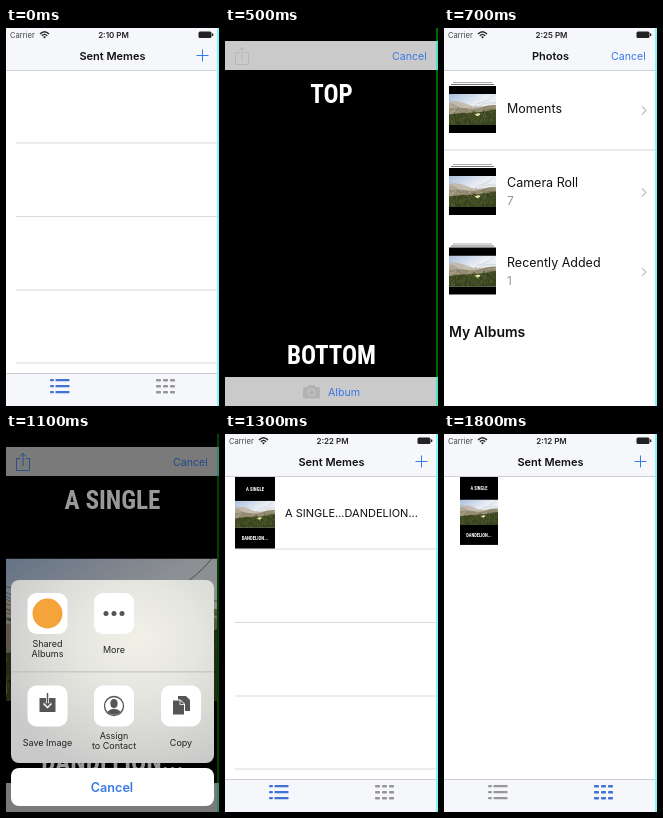
An HTML page that plays this animation: 213x378 px, repeating every 2 s.

```html
<!DOCTYPE html>
<html lang="en">
<head>
<meta charset="utf-8">
<title>Meme app walkthrough</title>
<style>
  html, body { margin: 0; width: 100%; height: 100%; overflow: hidden; background: #fff; }
  svg { display: block; width: 100vw; height: 100vh; }
  text { font-family: Inter, Roboto, sans-serif; white-space: pre; }
  .meme { font-family: "Roboto Condensed", "Liberation Sans Narrow", Roboto, sans-serif;
          font-weight: 800; font-stretch: 75%; }
</style>
</head>
<body>
<svg id="stage" viewBox="0 0 213 378" preserveAspectRatio="none"></svg>
<script>
const BLUE = '#3a79e8', ICON = '#4272d4', GRAY = '#979797', BAR = '#f5f7fb', EDITOR_BAR = '#cacaca';

const rect = (x, y, w, h, fill, r = 0) =>
  `<rect x="${x}" y="${y}" width="${w}" height="${h}" fill="${fill}" rx="${r}"/>`;
const line = (d, color, width = 1) =>
  `<path d="${d}" fill="none" stroke="${color}" stroke-width="${width}"/>`;
const shape = (d, fill) => `<path d="${d}" fill="${fill}"/>`;
const circle = (x, y, r, fill) => `<circle cx="${x}" cy="${y}" r="${r}" fill="${fill}"/>`;
const text = (s, x, y, size, fill = '#111', weight = 400, anchor = 'start') =>
  `<text x="${x}" y="${y}" font-size="${size}" fill="${fill}" font-weight="${weight}" text-anchor="${anchor}">${s}</text>`;
const centered = (s, x, y, size, fill, weight) => text(s, x, y, size, fill, weight, 'middle');
const caption = (s, x, y, size) =>
  `<text class="meme" x="${x}" y="${y}" font-size="${size}" fill="#fff" text-anchor="middle">${s}</text>`;
const photo = (x, y, w, h) => `<use href="#photo" x="${x}" y="${y}" width="${w}" height="${h}"/>`;

function random(seed) {
  return () => (seed = (seed * 16807) % 2147483647) / 2147483647;
}

// Dune landscape with plants and one pale flower, 169 x 113
function photoSymbol() {
  const rnd = random(77);
  const num = v => v.toFixed(1);
  const greens = ['#27301a', '#3c4a20', '#596c2c', '#7d8a45', '#2f3a1c', '#5c4a32', '#465524'];
  let shrubs = '', plants = '', stalks = '';
  for (let i = 0; i < 70; i++) {
    const x = rnd() * 169, y = 44 + rnd() * 28;
    shrubs += line(`M${num(x)} ${num(y)}l${num(4 + rnd() * 6)} ${num(rnd() * 4 - 1)}`,
      ['#6d6a50', '#d0c8bb', '#7f7a5c'][i % 3], 1.5);
  }
  for (let i = 0; i < 330; i++) {
    const x = rnd() * 169, depth = rnd() * 50, h = 5 + rnd() * 8, lean = rnd() * 6 - 3;
    const y = 79 - x * 0.1 + depth;
    plants += line(`M${num(x)} ${num(y)}q0 ${num(-h / 2)} ${num(lean)} ${num(-h)}`,
      greens[i % greens.length], 1.5);
  }
  for (let i = 0; i < 9; i++) {
    const x = rnd() * 40 - 30, y = 20 + rnd() * 24;
    stalks += line(`M${num(x)} ${num(y)}q34 4 52 ${num(24 + rnd() * 16)}`, '#716a50', 0.6);
  }
  return `<linearGradient id="sky" x2="0.55" y2="0.6">
      <stop stop-color="#a9bedd"/><stop offset=".75" stop-color="#e9eef4"/></linearGradient>
    <symbol id="photo" viewBox="0 0 169 113" preserveAspectRatio="none">
      ${rect(0, 0, 169, 113, 'url(#sky)')}
      ${shape('M0 34Q14 24 34 27T70 39T112 46L169 42V113H0Z', '#c6beb2')}
      ${shape('M0 52Q30 46 62 52T110 50Q140 38 169 40V113H0Z', '#999077')}
      ${shrubs}
      ${shape('M0 75Q40 68 80 68T169 56V113H0Z', '#3c4722')}
      ${stalks}
      ${line('M169 34Q120 24 92 60M165 0Q140 30 100 36M169 44Q140 34 118 62', '#7d7558', 0.7)}
      ${plants}
      ${line('M103 76l2 18', '#728a3a', 1.5)}
      ${shape('M92 72l5 1 6-3 4 1 6-1-2 6-6 4-7-1Z', '#f1edc4')}
      ${shape('M97 75h9l-3 3h-4Z', '#e2cf62')}
    </symbol>`;
}

function meme(x, y, width) {
  return `<g transform="translate(${x} ${y}) scale(${width / 169})">
    ${rect(0, 0, 169, 302, '#000')}${photo(0, 100, 169, 113)}
    ${caption('A SINGLE', 84.5, 60, 20)}${caption('DANDELION...', 84.5, 268, 20)}</g>`;
}

const plus = line('M190.5 27.5h12M196.5 21.5v12', BLUE);
const cancel = text('Cancel', 167, 32, 10.6, BLUE);
const title = s => centered(s, 106.5, 31.5, 11, '#111', 600);
const chevron = y => line(`M198 ${y - 4}l4 4-4 4`, '#c2c2c6', 1.2);

const statusBar = time => text('Carrier', 4, 10, 7.6, '#444')
  + line('M34 6Q38.500 1.500 43 6M35.800 7.800Q38.500 5 41.200 7.800', '#222', 1.4)
  + shape('M37 8.800Q38.500 7.500 40 8.800L38.500 10.500Z', '#222')
  + centered(time, 107.5, 10, 8, '#222', 600)
  + rect(192.5, 3.5, 13, 6.5, '#222', 1.5) + rect(206, 5.5, 1.3, 2.5, '#222');

function lightScreen(time, body) {
  return rect(0, 0, 213, 378, '#fff') + body
    + rect(0, 0, 213, 42, BAR) + rect(0, 42, 213, 0.7, '#b9bcc2')
    + statusBar(time) + rect(211, 0, 2, 378, '#7ff7ff');
}

function tabBar(active) {
  const listColor = active === 'list' ? ICON : GRAY;
  const gridColor = active === 'grid' ? ICON : GRAY;
  let icons = '';
  for (const y of [351, 357, 363]) {
    icons += rect(44, y, 4, 2.3, listColor, 1) + rect(49.5, y, 14, 2.3, listColor, 0.6);
    for (const x of [150, 157, 164]) icons += rect(x, y, 5, 2.5, gridColor, 0.8);
  }
  return rect(0, 345, 211, 33, BAR) + rect(0, 345, 211, 0.7, '#b9bcc2') + icons;
}

const tabScreen = (time, tab, body, header) =>
  lightScreen(time, body + tabBar(tab)) + header;
const rowLines = [115, 188.5, 262, 335].map(y => rect(10, y - 0.5, 201, 1, '#dcdce0')).join('');
const homeHeader = title('Sent Memes') + plus;

const editorBar = (y, h) => rect(0, y, 211, h, EDITOR_BAR) + rect(211, y, 2, h, '#4fe3c4');

function editor(content, shareColor) {
  return rect(0, 0, 213, 378, '#000') + content + rect(211, 0, 2, 378, '#006a00')
    + editorBar(13, 29) + editorBar(349, 29)
    + line('M14.500 24.500h-4v12h13v-12h-4M17 32v-12.500M13.800 22.500l3.200-3.200 3.200 3.200', shareColor, 0.9)
    + cancel
    + rect(78, 359, 17, 11.5, '#b2b2b2', 1.5) + rect(83, 357, 7, 4, '#b2b2b2', 1)
    + `<circle cx="86.500" cy="364.500" r="3.300" fill="none" stroke="${EDITOR_BAR}"/>`
    + text('Album', 103, 367.5, 10.7, BLUE);
}

const filledEditor = editor(photo(0, 124.5, 211, 142.5)
  + caption('A SINGLE', 106.5, 74.7, 25.2) + caption('DANDELION...', 106.5, 336.5, 25.2), BLUE);

function album(y, name, count) {
  return rect(9, y - 4, 39, 1, '#aaa') + rect(7, y - 2, 43, 1, '#777')
    + rect(5, y, 47, 47, '#000') + photo(5, y + 8, 47, 31)
    + text(name, 63, count ? y + 19 : y + 27, 12.5)
    + (count ? text(count, 63, y + 37, 12, GRAY) : '') + chevron(y + 24.5);
}

const albums = album(58, 'Moments') + album(140, 'Camera Roll', '7') + album(219.5, 'Recently Added', '1')
  + rect(0, 121.5, 211, 1, '#d6d6da') + text('My Albums', 5, 308.5, 14, '#111', 600);

function action(x, y, icon, labels) {
  const first = labels.length > 1 ? y + 53.5 : y + 60;
  return rect(x - 20, y, 40, 41, '#fff', 9) + icon
    + labels.map((s, i) => centered(s, x, first + i * 10, 9, '#222')).join('');
}

function shareSheet() {
  const ink = '#555';
  const dots = [100, 108, 116].map(x => circle(x, 179.5, 2.5, ink)).join('');
  const save = shape('M33.500 264h16v14h-16Z', ink)
    + line('M41.500 260v12M38 269l3.500 3.500 3.500-3.500', '#fff', 3)
    + line('M41.500 259v12M38.500 268.500l3 3 3-3', ink, 1.5);
  const contact = `<circle cx="108" cy="272" r="9.500" fill="#fff" stroke="${ink}" stroke-width="1.300"/>`
    + `<ellipse cx="108" cy="269.500" rx="3.600" ry="4.500" fill="${ink}"/>`
    + shape('M101 278Q108 271.500 115 278Q108 283.500 101 278Z', ink);
  const copy = shape('M172 262h8l4 4v11h-12Z', ink)
    + `<path d="M166.500 266h8l4 4v11h-12Z" fill="${ink}" stroke="#fff"/>`
    + line('M174 266v4.500h4.500', '#fff', 0.8);
  return `<radialGradient id="sheet" cx=".62" cy=".32" r=".75"><stop stop-color="#f1f1e8"/>
      <stop offset=".4" stop-color="#e6e6e0"/><stop offset="1" stop-color="#c9c9c9"/></radialGradient>`
    + rect(0, 0, 213, 378, 'rgba(0,0,0,.4)')
    + rect(5, 146, 203, 183, 'url(#sheet)', 8) + rect(5, 237.5, 203, 0.8, '#b4b4b2')
    + action(41.5, 159, circle(41.5, 179.5, 15, '#f5a33b'), ['Shared', 'Albums'])
    + action(108, 159, dots, ['More'])
    + action(41.5, 251.5, save, ['Save Image'])
    + action(108, 251.5, contact, ['Assign', 'to Contact'])
    + action(175, 251.5, copy, ['Copy'])
    + rect(5, 334, 203, 38, '#fff', 8) + centered('Cancel', 106, 358, 12.6, BLUE, 600);
}

const detail = tabScreen('2:22 PM', 'list',
  meme(21.3, 43, 169.7) + rect(163.3, 291, 1.3, 25, '#4670c8'),
  line('M12.500 21.500l-6 6.500 6 6.500', BLUE, 1.8) + text('Sent Memes', 16.3, 32, 11.1, BLUE));

// [start time in ms, markup]
const scenes = [
  [0, tabScreen('2:10 PM', 'list', rowLines, homeHeader)],
  [200, tabScreen('2:12 PM', 'grid', '', homeHeader)],
  [500, editor(caption('TOP', 106.5, 75, 25) + caption('BOTTOM', 106.5, 335.5, 25), '#b5b5b5')],
  [700, lightScreen('2:25 PM', albums) + title('Photos') + cancel],
  [900, filledEditor],
  [1100, filledEditor + shareSheet()],
  [1300, tabScreen('2:22 PM', 'list',
    rowLines + meme(10, 43, 40) + text('A SINGLE...DANDELION...', 60, 83, 11), homeHeader)],
  [1500, detail],
  [1800, tabScreen('2:12 PM', 'grid', meme(16, 43, 38), homeHeader)],
];

const stage = document.getElementById('stage');
stage.innerHTML = `<defs>${photoSymbol()}</defs>`
  + scenes.map(([, markup]) => `<g class="scene" visibility="hidden">${markup}</g>`).join('');
const groups = stage.querySelectorAll('.scene');
let shown = -1;

function draw() {
  const t = performance.now() % 2000;
  const current = scenes.findLastIndex(([start]) => t >= start);
  if (current !== shown) {
    groups.forEach((g, i) => g.setAttribute('visibility', i === current ? 'visible' : 'hidden'));
    shown = current;
  }
  requestAnimationFrame(draw);
}
draw();
</script>
</body>
</html>
```
